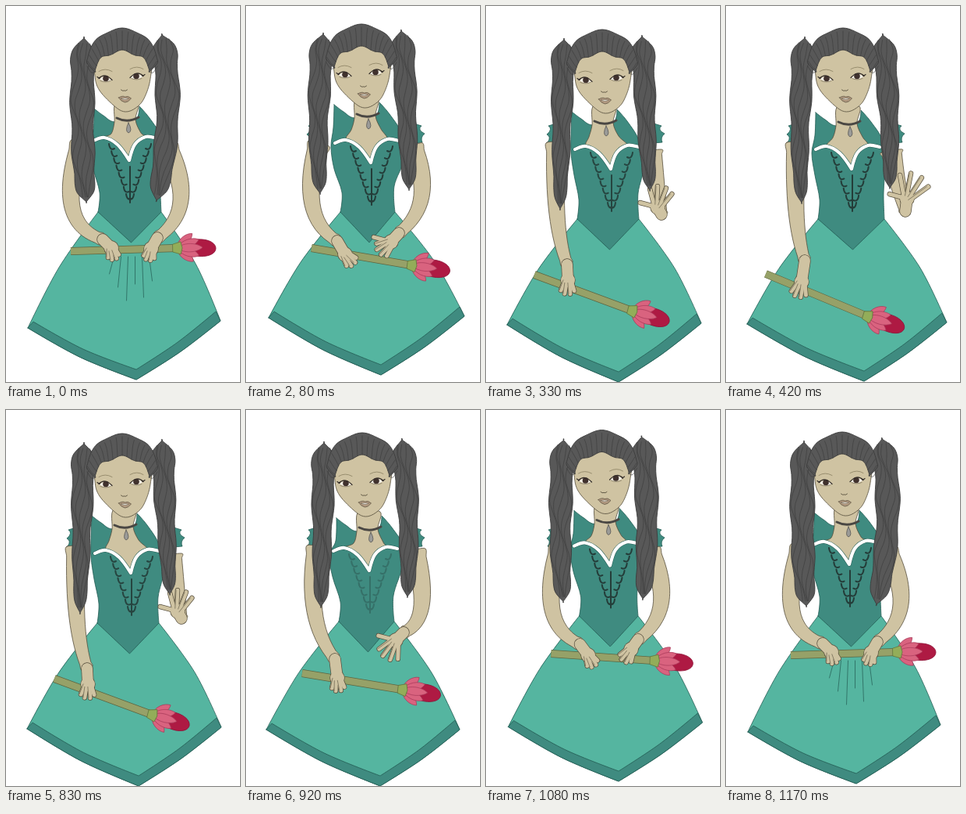
Recreate the animation shown at these times as an HTML page. Size 300 by 480 pixels, loop 1.26 s.

```html
<!DOCTYPE html>
<html lang="en">
<head>
<meta charset="utf-8">
<title>Waving princess</title>
<style>
html, body { margin: 0; width: 100%; height: 100%; overflow: hidden; background: #fff; }
svg { display: block; width: 100vw; height: 100vh; }
</style>
</head>
<body>
<svg id="stage" viewBox="0 0 300 480" stroke-linecap="round" stroke-linejoin="round"></svg>
<script>
// A pose is a small skeleton; every outline is built from its joints.
// tails: [middle, tip]; arms: [shoulder, elbow, wrist]; hands: [x, y, angle, finger length]
const clasped = {
  head: [149, 75], neck: [155, 145], bust: [158, 197], waist: [118, 199, 263],
  hem: [[28, 411], [167, 477], [275, 402]],
  tails: [[[98, 150], [103, 250]], [[207, 140], [193, 248]]], tailEnd: 13,
  arms: [[[97, 175], [85, 257], [124, 298]], [[206, 180], [224, 248], [194, 296]]],
  hands: [[135, 309, 75, 8], [186, 310, 105, 8]],
  rod: [[83, 313], [219, 309]], sleeves: false, folds: true, lace: 1
};
const parting = {
  head: [148, 70], neck: [155, 140], bust: [160, 200], waist: [121, 191, 263],
  hem: [[29, 398], [173, 471], [280, 396]],
  tails: [[[93, 140], [95, 239]], [[206, 135], [209, 234]]], tailEnd: 9,
  arms: [[[94, 175], [85, 253], [117, 300]], [[213, 180], [225, 243], [196, 290]]],
  hands: [[127, 317, 50, 10], [186, 301, 140, 14]],
  rod: [[84, 309], [212, 331]], sleeves: true, folds: false, lace: 1
};
const loose = {
  head: [149, 76], neck: [158, 152], bust: [158, 205], waist: [119, 190, 270],
  hem: [[26, 408], [172, 480], [274, 408]],
  tails: [[[98, 148], [96, 251]], [[208, 140], [207, 238]]], tailEnd: 9,
  arms: [[[92, 175], [88, 257], [114, 318]], [[216, 180], [225, 250], [202, 284]]],
  hands: [[117, 342, 85, 10], [192, 294, 118, 19]],
  rod: [[72, 336], [200, 357]], sleeves: true, folds: false, lace: 0.35
};
const lifting = {
  head: [149, 77], neck: [152, 149], bust: [160, 208], waist: [117, 196, 272],
  hem: [[27, 407], [170, 480], [276, 405]],
  tails: [[[97, 150], [95, 259]], [[205, 140], [210, 235]]], tailEnd: 8,
  arms: [[[91, 175], [91, 265], [104, 330]], [[212, 185], [219, 230], [225, 266]]],
  hands: [[105, 350, 92, 11], [220, 257, -78, 20]],
  rod: [[62, 343], [187, 389]], sleeves: true, folds: false, lace: 0.9
};
const waving = {
  head: [150, 75], neck: [157, 150], bust: [161, 208], waist: [118, 203, 272],
  hem: [[27, 406], [177, 479], [283, 404]],
  tails: [[[95, 148], [97, 251]], [[209, 140], [210, 232]]], tailEnd: 8,
  arms: [[[91, 175], [90, 262], [101, 325]], [[212, 185], [220, 225], [230, 262]]],
  hands: [[97, 352, 105, 13], [232, 246, -68, 26]],
  rod: [[51, 342], [181, 396]], sleeves: true, folds: false, lace: 1
};

const INK = '#554d3c', SKIN = '#cfc3a2', HAIR = '#585858', HAIR_INK = '#3c3c3c';
const TEAL = '#3f8b80', TEAL_INK = '#235b52', MINT = '#55b5a0';

const mix = (a, b, t) => a + (b - a) * t;
const add = ([x, y], dx, dy) => [x + dx, y + dy];
const corner = ([x, y]) => [x, y, true];
const range = n => Array.from({ length: n }, (_, i) => i);
const polar = ([x, y], r, degrees) =>
  [x + r * Math.cos(degrees * Math.PI / 180), y + r * Math.sin(degrees * Math.PI / 180)];

function between(a, b) {
  if (typeof a === 'number') return mix(a, b, 0.5);
  if (typeof a !== 'object') return a;
  const entries = Object.keys(a).map(key => [key, between(a[key], b[key])]);
  return Array.isArray(a) ? entries.map(e => e[1]) : Object.fromEntries(entries);
}

// Smooth path through the points, with sharp turns at corners.
function curve(pts, closed = true) {
  const n = pts.length;
  const at = i => closed ? pts[(i + n) % n] : pts[Math.max(0, Math.min(n - 1, i))];
  const handle = (i, sign) => [0, 1].map(axis =>
    at(i)[axis] + (at(i)[2] ? 0 : (at(i + 1)[axis] - at(i - 1)[axis]) * sign / 6));
  let d = `M${pts[0][0]},${pts[0][1]}`;
  for (let i = 0; i < (closed ? n : n - 1); i++) {
    d += `C${handle(i, 1)} ${handle(i + 1, -1)} ${at(i + 1).slice(0, 2)}`;
  }
  return closed ? d + 'Z' : d;
}

// Band around a bent spine: point(t, u) runs along t and across u from -1 to 1.
function ribbon([a, m, b], width) {
  const ctrl = [0, 1].map(k => 2 * m[k] - (a[k] + b[k]) / 2);
  const point = (t, u) => {
    const [x, y] = [0, 1].map(k => mix(mix(a[k], ctrl[k], t), mix(ctrl[k], b[k], t), t));
    const [dx, dy] = [0, 1].map(k => mix(ctrl[k] - a[k], b[k] - ctrl[k], t));
    const reach = u * width(t) / Math.hypot(dx, dy);
    return [x - dy * reach, y + dx * reach];
  };
  const edge = u => range(17).map(i => point(i / 16, u));
  return { point, outline: edge(1).concat(edge(-1).reverse()) };
}

const path = (d, fill, stroke = 'none', width = 0.8, extra = '') =>
  `<path d="${d}" fill="${fill}" stroke="${stroke}" stroke-width="${width}" ${extra}/>`;
const line = (d, stroke, width, extra) => path(d, 'none', stroke, width, extra);
const segment = (a, b) => `M${a}L${b}`;

function tail(root, [middle, tip], end) {
  const { point, outline } = ribbon([root, middle, tip], t =>
    mix(16, end, t) * (1 + 0.09 * Math.sin(t * 21)) * Math.min(1, Math.sqrt(t * 9), Math.sqrt((1 - t) * 9)));
  const strands = [-0.65, -0.35, 0, 0.35, 0.65].map(u => curve(range(15).map(i => {
    const t = 0.03 + i * 0.067;
    return point(t, u + 0.27 * Math.sin(t * 17 + u * 3));
  }), false)).join('');
  return path(curve(outline), HAIR, HAIR_INK, 0.9) + line(strands, HAIR_INK, 0.8, 'opacity=".8"');
}

function crown(head) {
  const arc = (rx, ry, drop, wave) => range(19).map(i => {
    const a = Math.PI * i / 18;
    return add(head, -rx * Math.cos(a), drop - ry * Math.sin(a) + wave * Math.sin(a * 7));
  });
  const outer = arc(45, 44, -2, 1), fringe = arc(35, 26, 9, 2);
  const strands = outer.map((p, i) => curve([
    add(p, 0, 4), add(p, (head[0] - p[0]) * 0.12, 12), fringe[i]], false)).join('');
  return path(curve(outer.concat(fringe.reverse())), HAIR, HAIR_INK, 0.9) +
    line(strands, HAIR_INK, 0.8, 'opacity=".8"');
}

function face(head) {
  const gaze = add(head, -1.5, 16), chin = add(gaze, 6, 44), mouth = add(gaze, 5, 27);
  const outline = [
    add(head, -33, -12), add(head, 0, -28), add(head, 35, -12), add(head, 36, 18),
    add(head, 28, 43), add(chin, 13, -5), chin, add(chin, -13, -6), add(head, -29, 33), add(head, -35, 14)];
  const eye = side => `<g transform="translate(${gaze[0] + side * 19.5} ${gaze[1] - side * 1.5}) scale(${-side} 1)">` +
    path('M-8,1Q-1,-7 7,2Q0,6 -8,1Z', '#f5f1e8') +
    '<circle cy="0" r="3.8" fill="#40312d"/>' +
    line('M-9,0Q-1,-8 8,2M-8,0l-3,-2', '#302a27', 1.2) +
    line('M-7,3Q0,6 6,3', INK, 0.5) + line('M-9,-9Q-1,-14 8,-9', '#8b8063', 0.8) + '</g>';
  return path(curve(outline), SKIN, INK) + eye(-1) + eye(1) +
    line(`M${add(gaze, 0, 16)}q2,2 4,1q2,1 4,-1`, INK, 0.9) +
    `<g transform="translate(${mouth})">` +
    path('M-8,-1Q-3,-4 0,-2Q4,-4 8,0Q4,5 0,5Q-5,4 -8,-1Z', '#b49b82', INK, 0.7) +
    path('M-5,0Q0,-1 5,0Q0,3 -5,0Z', '#eee9df', INK, 0.5) + '</g>';
}

function dress({ neck, bust, waist: [left, right, y], hem, sleeves, folds, lace }) {
  const [waistL, waistR] = [[left, y, true], [right, y, true]];
  const front = [(left + right) / 2 + 2, y + 39, true];
  const bulge = (a, b, k) => {
    const length = Math.hypot(b[0] - a[0], b[1] - a[1]);
    return [(a[0] + b[0]) / 2 - (b[1] - a[1]) * k / length, (a[1] + b[1]) / 2 + (b[0] - a[0]) * k / length];
  };
  const edge = ([l, b, r]) => [corner(l), bulge(l, b, 5), corner(b), bulge(b, r, 3), corner(r)];
  const border = edge([add(hem[0], 7, -8), add(hem[1], 0, -13), add(hem[2], -6, -12)]);
  const skirt = [waistL, bulge(waistL, hem[0], 6), ...edge(hem), bulge(hem[2], waistR, 7), waistR];

  const trim = [add(bust, -46, -25), add(bust, -32, -29), add(bust, -15, -20), corner(bust),
    add(bust, 7, -20), add(bust, 21, -30), add(bust, 36, -28)];
  const bodice = [corner(add(neck, -42, -14)), add(neck, -30, -5), add(neck, -16, 3), add(neck, 11, 0),
    corner(add(neck, 16, -17)), add(neck, 29, -2), add(neck, 44, 22), add(bust, 43, -6),
    add(waistR, -1, -33), waistR, front, waistL, add(waistL, 2, -25), add(bust, -47, 8),
    add(bust, -51, -20), add(neck, -43, 15)];
  const chest = [add(neck, -14, -22), add(neck, -16, 3), add(neck, -20, 18), ...trim.slice(1, 6),
    add(neck, 18, 17), add(neck, 11, 0), add(neck, 14, -22)];

  let curls = segment(add(bust, 1, 8), add(bust, 1, 54));
  for (const i of range(8)) {
    for (const side of [-1, 1]) {
      curls += `M${add(bust, 1 + side * mix(27, 5, i / 7), mix(-21, 43, i / 7))}q${-side},9 ${-side * 7},6`;
    }
  }
  const puffs = 'M90,150L80,153Q86,157 78,164Q84,167 79,174L90,178ZM215,150L225,153Q219,158 229,163Q223,168 226,174L215,175Z';
  const pleats = range(6).map(i => segment(add(front, i * 9 - 22, 18), add(front, i * 11 - 28, 40 + i * 17 % 38))).join('');
  return path(curve(skirt), MINT, TEAL_INK) +
    path(curve(edge(hem).concat(border.reverse())), TEAL, TEAL_INK) +
    (folds ? line(pleats, TEAL_INK, 0.7) : '') +
    (sleeves ? path(puffs, TEAL, TEAL_INK) : '') +
    path(curve(bodice), TEAL, TEAL_INK) + path(curve(chest), SKIN, INK) +
    line(curve(trim, false), TEAL_INK, 5.2) + line(curve(trim, false), '#fff', 4.2) +
    line(curls, '#243d39', 2, `opacity="${lace}"`);
}

function rose([from, to]) {
  const angle = Math.atan2(to[1] - from[1], to[0] - from[0]) * 180 / Math.PI;
  const petals = [-42, 40, -20, 20, 0].map(turn => {
    const l = 33 - Math.abs(turn) / 7;
    return path(`M0,0C${l * 0.3},-8 ${l * 0.8},-6 ${l},0C${l * 0.8},6 ${l * 0.3},8 0,0Z`,
      '#d9637f', '#a83a5a', 0.7, `transform="rotate(${turn})"`);
  }).join('');
  return line(segment(from, to), '#5d6540', 10, 'stroke-linecap="butt"') +
    line(segment(from, to), '#96a168', 8.6, 'stroke-linecap="butt"') +
    `<g transform="translate(${to}) rotate(${angle * 0.75})">` +
    path('M18,-9C31,-13 49,-9 50,1C50,11 32,14 18,9Z', '#ae1a43', '#8d1438') + petals +
    path('M-5,-5L5,-8L7,0L5,8L-5,5Z', '#93ad59', '#62773d') + '</g>';
}

function arm(joints, [x, y, angle, length]) {
  const limb = ribbon(joints, t => mix(13, 7, t)).outline;
  const palm = [x, y], wrist = joints[2], open = length > 13.5;
  const fingers = range(4).map(i => {
    const turn = angle + (i - 1.5) * (6 + length * 0.6);
    const base = polar(palm, 4, angle + (i - 1.5) * 60);
    return segment(base, polar(base, length + 3, turn));
  });
  if (open) fingers.push(segment(palm, polar(palm, 23, 195)));
  const hand = (extra, color) => line(segment(wrist, palm), color, 14 + extra) +
    fingers.map(d => line(d, color, 5 + extra)).join('') +
    `<circle cx="${x}" cy="${y}" r="${9 + extra / 2}" fill="${color}"/>`;
  const creases = fingers.slice(1, 4).map(d => line(d, INK, 0.6, 'transform="translate(-2 0)"')).join('');
  return path(curve(limb), SKIN, INK) + hand(1.4, INK) + hand(0, SKIN) + creases;
}

function necklace(neck) {
  return line(`M${add(neck, -13, -2)}q14,7 28,-1`, '#4a4743', 3) +
    path(`M${add(neck, 2, 4)}q-5,11 0,13q6,-2 0,-13Z`, '#9b9b98', '#585753');
}

const draw = p => dress(p) + rose(p.rod) +
  p.arms.map((joints, i) => arm(joints, p.hands[i])).join('') +
  face(p.head) + necklace(p.neck) +
  tail(add(p.head, -49, -34), p.tails[0], p.tailEnd) +
  tail(add(p.head, 51, -38), p.tails[1], p.tailEnd) + crown(p.head);

const LOOP = 1260;
const steps = [
  [0, clasped], [80, parting], [170, loose], [250, between(loose, lifting)],
  [330, lifting], [420, waving], [830, lifting], [920, loose],
  [1000, parting], [1080, between(parting, clasped)], [1170, clasped]
].map(([start, pose]) => ({ start, markup: draw(pose) }));

const stage = document.getElementById('stage');
let shown;
function update() {
  const time = performance.now() % LOOP;
  const step = steps.filter(s => s.start <= time).pop();
  if (step !== shown) stage.innerHTML = step.markup;
  shown = step;
  requestAnimationFrame(update);
}
update();
</script>
</body>
</html>
```
